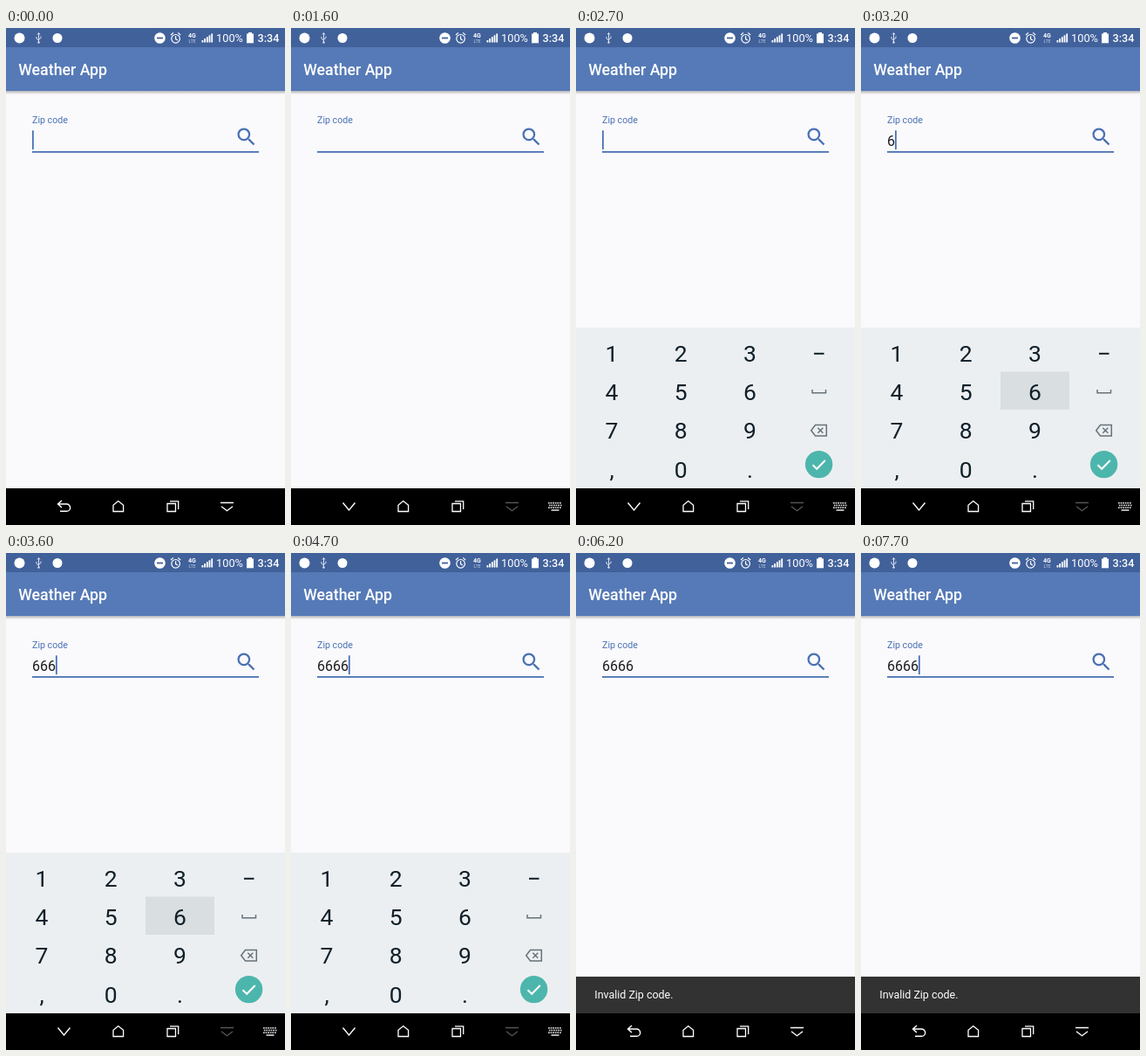
These frames come from a looping animation (320x569 px, 8 s). An HTML page with a canvas:

```html
<!DOCTYPE html>
<html lang="en">
<head>
<meta charset="utf-8">
<title>Weather App</title>
<style>
  html, body { margin: 0; width: 100%; height: 100%; overflow: hidden; background: #000; }
  canvas { display: block; width: 320px; height: 569px; }
</style>
</head>
<body>
<canvas id="stage"></canvas>
<script>
const W = 320, H = 569, LOOP = 8000, STEP = 100;
const canvas = document.getElementById('stage');
const ratio = window.devicePixelRatio || 1;
canvas.width = Math.round(W * ratio);
canvas.height = Math.round(H * ratio);
const ctx = canvas.getContext('2d');

const BLUE = '#4a72b4', STATUS = '#41619b', BAR = '#567ab7', PAGE = '#faf9fc';
const KEY_TEXT = '#10202a', KEY_ICON = '#66727a', WHITE = '#fff';
const SEARCH = new Path2D('M15.5 14h-.79l-.28-.27A6.47 6.47 0 0 0 16 9.5 6.5 6.5 0 1 0 9.5 16c1.61 0 3.09-.59 4.23-1.57l.27.28v.79l5 4.99L20.49 19zm-6 0a4.5 4.5 0 1 1 0-9 4.5 4.5 0 0 1 0 9z');
const KEY_ROWS = ['123', '456', '789', ',0.'];
const COLUMNS = [41, 120.3, 199.5];

// Each tap shows the pressed key for one step, then adds a digit.
const TAPS = [2900, 3200, 3400, 3600];

const clamp = v => Math.max(0, Math.min(1, v));
const between = (t, a, b) => t >= a && t < b;

function rect(color, x, y, w, h) {
  ctx.fillStyle = color;
  ctx.fillRect(x, y, w, h);
}

function disc(color, x, y, r) {
  ctx.fillStyle = color;
  ctx.beginPath();
  ctx.arc(x, y, r, 0, Math.PI * 2);
  ctx.fill();
}

function line(path, color, width = 1.3) {
  ctx.strokeStyle = color;
  ctx.lineWidth = width;
  ctx.stroke(new Path2D(path));
}

function text(str, x, y, size, color, weight = 400, align = 'left') {
  ctx.font = `${weight} ${size}px Roboto, sans-serif`;
  ctx.textAlign = align;
  ctx.fillStyle = color;
  ctx.fillText(str, x, y);
}

function faded(alpha, draw) {
  ctx.save();
  ctx.globalAlpha *= alpha;
  draw();
  ctx.restore();
}

function statusBar() {
  rect(STATUS, 0, 0, W, 22);
  disc(WHITE, 15.5, 11.5, 6);
  line('M37.5 6v11M35 10v2l2.5 2.5M40 9.5v2L37.5 13M36 7.5l1.5-2 1.5 2', '#dbe2ee', 1);
  disc('#dbe2ee', 37.5, 16.5, 1.2);
  disc(WHITE, 59, 11.5, 5.5);

  disc(WHITE, 176.5, 11.5, 6.3);
  rect(STATUS, 173, 10.6, 7, 1.8);

  line('M189.8 12.3a4.8 4.8 0 1 0 9.6 0a4.8 4.8 0 1 0-9.6 0M194.6 9.3v3.3l2.3 1.4M189 8l3-2.6M200.2 8l-3-2.6', WHITE, 1.2);

  text('4G', 213.5, 10.5, 7, WHITE, 700, 'center');
  text('LTE', 213.5, 17, 5, '#a9b9d6', 500, 'center');
  for (let i = 0; i < 5; i++) {
    const h = 2.5 + i * 1.9;
    rect(WHITE, 224.5 + i * 2.7, 16.5 - h, 1.8, h);
  }
  text('100%', 241, 16, 12.8, WHITE);
  rect(WHITE, 276, 6.5, 8, 10.8);
  rect(WHITE, 278, 5, 4, 2);
  text('3:34', 288.5, 16, 12.6, WHITE, 500);
}

function appBar() {
  rect(BAR, 0, 22, W, 50);
  text('Weather App', 14.2, 54.3, 17.78, WHITE, 500);
  const shadow = ctx.createLinearGradient(0, 72, 0, 76);
  shadow.addColorStop(0, 'rgba(0,0,0,.28)');
  shadow.addColorStop(1, 'rgba(0,0,0,0)');
  rect(shadow, 0, 72, W, 4);
}

function field(t) {
  const digits = TAPS.filter(tap => t >= tap + STEP).length;
  const caretOn = !between(t % 1000, 200, 700) || between(t, 3200, 3700);
  text('Zip code', 30, 108.6, 10.67, BLUE);
  text('6'.repeat(digits), 30, 135, 16, '#1c1c1e');
  if (caretOn) rect(BLUE, 30 + digits * 8.98, 117.3, 1.8, 21.7);
  rect(BLUE, 30, 141, 260, 1.8);

  if (t >= 5100) {
    const glow = 0.045 * (1 - clamp((t - 5400) / 400));
    rect(`rgba(0,0,0,${glow})`, 262, 111, 27, 27);
  }
  ctx.save();
  ctx.translate(262, 111);
  ctx.scale(1.14, 1.14);
  ctx.fillStyle = BLUE;
  ctx.fill(SEARCH, 'evenodd');
  ctx.restore();
}

function snackbar(t) {
  if (t < 5300) return;
  const left = 1 - clamp((t - 5250) / 250);
  const y = 485 + 42 * left ** 3;
  rect('#323232', 0, y, W, 42);
  faded(1 - left, () => text('Invalid Zip code.', 21.3, y + 25.4, 12.44, WHITE));
}

function navBar(typing) {
  rect('#000', 0, 527, W, 42);
  line(typing ? 'M59.5 543.5l7 8.5 7-8.5'
              : 'M64 541l-4.5 4 4.5 4M60 545h9.5a4 4 0 0 1 0 8.3H62', WHITE, 1.4);
  line('M123 553.5v-7.3l5.8-4.7 5.8 4.7v7.3z', WHITE);
  line('M185 544.5h9.5v9h-9.5zM188 541.8h9.7v9.2', WHITE);
  line('M246 543.5h15M247 547.7l6.5 5 6.5-5', typing ? '#555' : WHITE, 1.4);
  if (!typing) return;
  for (let row = 0; row < 3; row++)
    for (let i = 0; i < 6; i++)
      rect('#ddd', 295 + (row % 2) * 0.8 + i * 2.6, 543 + row * 2.7, 1.7, 1.6);
  rect('#ddd', 298.5, 551.2, 9, 1.6);
}

function keyboard(t) {
  const enter = clamp((t - 1650) / 200), exit = clamp((t - 5280) / 200);
  if (!enter || exit === 1) return;
  ctx.save();
  ctx.globalAlpha = Math.min(1, enter * 1.35) * (1 - 0.7 * exit);
  ctx.translate(0, 18 * (1 - enter) ** 2 + 21 * exit);

  // Cover the panel first so the keys fade against what lies behind.
  const pressed = TAPS.some(tap => between(t, tap, tap + STEP));
  rect('#eceff1', 0, 343, W, 184);
  if (pressed) rect('#d9dee0', 160, 393.5, 79, 43.5);
  KEY_ROWS.forEach((row, r) => [...row].forEach((key, c) =>
    text(key, COLUMNS[c], 381.9 + r * 44.2, 26.5, KEY_TEXT, 400, 'center')));

  rect(KEY_TEXT, 273, 371.8, 11.5, 2);
  line('M271 414v3.7h15.5V414', KEY_ICON, 1.5);
  line('M274.5 454.5H287.3v12.5H274.5l-4.8-6.2zM277.3 457.8l6 6M283.3 457.8l-6 6', KEY_ICON, 1.5);
  disc('#4db6ac', 278.6, 499.6, 15.7);
  line('M271.5 500.2l4.7 4.6 9.6-9.8', WHITE, 2);
  ctx.restore();
}

function draw(t) {
  ctx.setTransform(ratio, 0, 0, ratio, 0, 0);
  rect(PAGE, 0, 0, W, H);
  statusBar();
  appBar();
  field(t);
  snackbar(t);
  navBar(between(t, 1500, 5300));
  keyboard(t);
}

const start = performance.now();
function tick() {
  const t = (performance.now() - start) % LOOP;
  draw(Math.floor(t / STEP) * STEP);
  requestAnimationFrame(tick);
}
tick();
</script>
</body>
</html>
```
